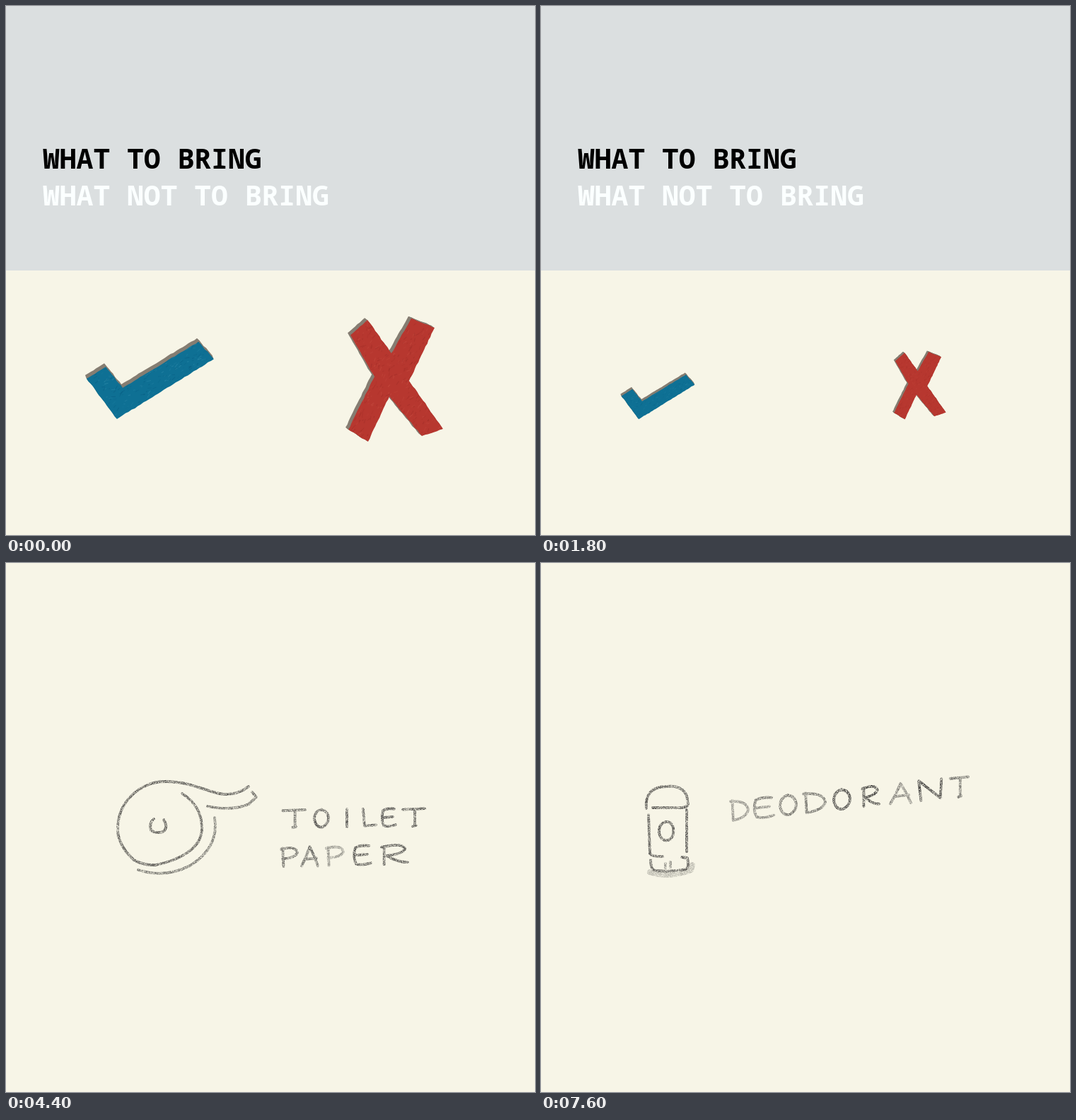
These frames come from a looping animation (748 by 748 pixels, 8 s). An HTML page with a canvas:

```html
<!DOCTYPE html>
<html lang="en">
<head>
<meta charset="utf-8">
<title>What to bring</title>
<style>
html, body { margin: 0; width: 100%; height: 100%; overflow: hidden; background: #f7f5e7; }
canvas { display: block; width: 100vw; height: 100vh; }
</style>
</head>
<body>
<canvas id="stage" width="748" height="748"></canvas>
<script>
const SIZE = 748, LOOP = 8000;
const ctx = document.getElementById('stage').getContext('2d');

function seeded(s) {
  return () => {
    s = (s + 0x6d2b79f5) | 0;
    let r = Math.imul(s ^ (s >>> 15), s | 1);
    r ^= r + Math.imul(r ^ (r >>> 7), r | 61);
    return ((r ^ (r >>> 14)) >>> 0) / 4294967296;
  };
}

function newCanvas(size) {
  const c = document.createElement('canvas');
  c.width = c.height = size;
  return c;
}

// ---- paper cut-outs ----

function roughPath(pts, rnd) {
  const path = new Path2D();
  pts.forEach(([x, y], i) => {
    const [nx, ny] = pts[(i + 1) % pts.length];
    const steps = Math.ceil(Math.hypot(nx - x, ny - y) / 5);
    for (let k = 0; k < steps; k++) {
      const u = k / steps, j = k ? 1 : 0.4;
      path.lineTo(x + (nx - x) * u + (rnd() - 0.5) * j, y + (ny - y) * u + (rnd() - 0.5) * j);
    }
  });
  path.closePath();
  return path;
}

function cutout(pts, o) {
  const rnd = seeded(o.seed);
  const fibres = Array.from({ length: 900 }, () => {
    const a = o.angle + (rnd() - 0.5) * 1.1, n = 2 + rnd() * 5;
    return { x: rnd() * 185, y: rnd() * 185, dx: Math.cos(a) * n, dy: Math.sin(a) * n,
             color: rnd() < 0.45 ? o.light : o.dark, alpha: 0.1 + rnd() * 0.35 };
  });
  return { ...o, path: roughPath(pts, rnd), fibres };
}

const check = cutout(
  [[1, 58], [28, 41], [52, 71], [159, 6], [181, 30], [44, 115]],
  { seed: 5, fill: '#0e7094', light: '#3690ae', dark: '#07577c', angle: -0.5, shade: [-2, -5] });
const cross = cutout(
  [[7, 27], [31, 6], [65, 53], [93, 4], [126, 17], [90, 92], [138, 160], [108, 170],
   [62, 114], [32, 178], [4, 161], [41, 86]],
  { seed: 9, fill: '#b7372f', light: '#cb5648', dark: '#962a25', angle: -0.9, shade: [-4, -3] });

function drawCutout(m, x, y, scale) {
  ctx.save();
  ctx.translate(x, y);
  ctx.scale(scale, scale);
  ctx.fillStyle = '#857d72';
  for (let k = 5; k > 0; k--) {
    ctx.save();
    ctx.translate(m.shade[0] * k / 5, m.shade[1] * k / 5);
    ctx.fill(m.path);
    ctx.restore();
  }
  ctx.fillStyle = m.fill;
  ctx.fill(m.path);
  ctx.clip(m.path);
  ctx.lineWidth = 1.1;
  for (const f of m.fibres) {
    ctx.globalAlpha = f.alpha;
    ctx.strokeStyle = f.color;
    ctx.beginPath();
    ctx.moveTo(f.x, f.y);
    ctx.lineTo(f.x + f.dx, f.y + f.dy);
    ctx.stroke();
  }
  ctx.restore();
}

// ---- pencil drawings ----

// Hand lettering in a box of 10 by 10
const glyphs = {
  A: 'M0 10 Q3 5 5 0 Q8 5 10 10 M2 6.5 L9 6',
  B: 'M1 0 L1 10 M1 0 Q9 0 8 3 Q6 5 1 5 Q10 5 10 7.5 Q9 10 1 10',
  C: 'M9 1 Q4 -1 1 4 Q-1 9 5 10 Q8 10 10 8',
  D: 'M1 0 L1.5 10 M0 0.5 Q9 0 10 5 Q9 9 1.5 10',
  E: 'M9 0 Q4 -0.5 1.5 1 Q0 6 2 9.5 Q5 10.5 10 9 M1 5 L8 4.5',
  F: 'M2 0 L2 10 M1 0.5 L10 0 M2 5 L9 4.5',
  G: 'M8 0.5 Q2 0 0.5 5 Q1 9 5 8.5 Q9 7 10 4 L5 5 M9.5 4.5 L9 11',
  H: 'M0 0.5 L1 10 M8 0 L10 10 M1 6 L9 5',
  I: 'M5 0 L5 10',
  J: 'M8 0 L8 7 Q6 12 1 8',
  K: 'M1 0 L1 10 M9 0 L1 6 L10 10',
  L: 'M1 0 L2 9.5 L10 9',
  M: 'M0 10 L1 1 L5 7 L9 0 L10 10',
  N: 'M1 10 L0 0 L9 9 L9.5 -0.5',
  O: 'M5 0 Q0 1 0 5.5 Q1 10 5.5 10 Q10 8.5 10 4.5 Q9 0 4 0.3',
  P: 'M1 0.5 L1.5 10 M0 1 Q9 -1 10 3 Q8 6 1 6',
  R: 'M1 1 L1 10 M0 1 Q8 -1.5 9 2 Q8 4.5 2 5.5 Q6 9 10 9',
  S: 'M9 1 Q2 -1 2 3 Q9 5 9 8 Q6 11 1 9',
  T: 'M0 0.5 L10 0 M5.5 0.5 L5.5 9.5 M4.5 10 L6 9.5',
  W: 'M0 0.5 L1.5 10 L5 4 L8 9.5 L10 0',
  Y: 'M0 0 Q2 4 5 5 M10 0 L4 11',
  '-': 'M0 5 L10 4.5'
};

// Grain that is rubbed out of the pencil lines
const grain = newCanvas(256);
{
  const g = grain.getContext('2d'), img = g.createImageData(256, 256), rnd = seeded(31);
  for (let i = 3; i < img.data.length; i += 4) img.data[i] = rnd() ** 1.8 * 220;
  g.putImageData(img, 0, 0);
}

function sketch(build) {
  const layer = newCanvas(SIZE), c = layer.getContext('2d');
  c.lineCap = c.lineJoin = 'round';
  c.strokeStyle = '#2c2b2a';
  const stroke = (path, alpha = 0.85, width = 3.8) => {
    c.globalAlpha = alpha;
    c.lineWidth = width;
    c.stroke(typeof path === 'string' ? new Path2D(path) : path);
  };
  // widths: one for all letters or a list; shades: one digit for each letter, 9 is darkest
  const word = (text, xs, y, widths, h, slope = 0, shades = '') => {
    [...text].forEach((ch, i) => {
      const w = widths[i] || widths;
      const p = new Path2D();
      p.addPath(new Path2D(glyphs[ch]),
        new DOMMatrix([w / 10, slope * w / 25, 0, h / 10, xs[i], y + slope * (xs[i] - xs[0])]));
      stroke(p, (shades[i] || 7) / 10);
    });
  };
  build(stroke, word);
  c.globalCompositeOperation = 'destination-out';
  c.fillStyle = c.createPattern(grain, 'repeat');
  c.globalAlpha = 1;
  c.fillRect(0, 0, SIZE, SIZE);
  c.globalAlpha = 0.45;
  c.scale(5, 5);
  c.fillRect(0, 0, SIZE / 5, SIZE / 5);
  return layer;
}

const cap = sketch((stroke, word) => {
  stroke('M150 370 C150 300 180 270 225 268 C275 270 295 315 294 366');
  stroke('M150 370 Q220 350 294 366 Q340 372 346 390 Q320 398 284 386 Q215 374 152 388 L150 370');
  stroke('M225 268 Q238 310 236 358', 0.6);
  word('BALL', [390, 424, 458, 488], 304, 22, 28);
  word('CAP', [390, 426, 460], 354, 22, 28);
});

const hat = sketch((stroke, word) => {
  stroke('M209 347 Q211 337 218 336 Q245 331 269 340 L274 353', 0.75);
  stroke('M173 428 C162 405 164 378 190 364 Q215 360 245 363 C275 366 310 372 325 392 ' +
         'Q330 400 328 418 C327 440 318 453 295 453 L276 454');
  stroke('M173 430 Q195 441 225 443 Q250 444 265 451', 0.8);
  stroke('M208 402 C208 384 282 384 282 403 C282 420 210 420 208 402 Z', 0.75);
  stroke('M160 421 L160 450 Q163 464 178 474 Q197 487 198 498 L203 520', 0.75);
  stroke('M324 453 Q322 472 300 488 Q275 507 250 515 Q225 533 209 560', 0.8);
  stroke('M200 531 Q194 525 210 528 Q224 531 223 536 Q215 538 200 531', 0.7);
  stroke('M203 532 L203 549', 0.3);
  word('GOOFY', [378, 415, 442, 474, 512], 358, [27, 22, 22, 26, 24], 27, 0, '67765');
  word('WIDE-BRIMMED', [369, 420, 441, 468, 503, 523, 553, 579, 594, 628, 664, 693],
       424, [32, 4, 20, 22, 8, 21, 19, 4, 28, 29, 19, 18], 28, 0, '978778866788');
  word('HAT', [375, 402, 423], 470, [21, 21, 19], 25, 0, '873');
});

const jacket = sketch((stroke, word) => {
  stroke('M158 362 Q160 338 180 338 Q202 338 204 362 Q182 378 158 362');
  stroke('M158 362 Q134 368 126 390 L105 452 L124 460 L142 410');
  stroke('M204 362 Q228 368 236 390 L257 452 L238 460 L220 410');
  stroke('M142 396 L140 468 Q180 474 222 468 L220 396');
  stroke('M181 372 L181 468', 0.6);
  word('RAIN', [310, 346, 386, 402], 364, [24, 24, 4, 24], 28);
  word('JACKET', [310, 344, 378, 412, 446, 480], 414, 23, 28);
});

const roll = sketch((stroke, word) => {
  stroke('M343 316 Q328 328 308 327 C285 325 265 309 225 309 C190 309 156 338 158 380 ' +
         'C160 398 170 410 181 420 Q195 428 212 427 C245 420 277 404 277 375 C277 352 265 336 249 326', 0.8);
  stroke('M209 362 Q202 367 205 378 Q212 383 222 380 Q230 374 223 363', 0.8);
  stroke('M187 434 Q225 446 260 428 Q302 402 295 360', 0.65);
  stroke('M285 344 Q320 351 343 341 L354 331 L348 324', 0.75);
  word('TOILET', [391, 436, 480, 503, 530, 561], 349, [32, 20, 4, 20, 21, 31], 25, -0.01, '788888');
  word('PAPER', [389, 418, 453, 490, 531], 402, [23, 23, 24, 26, 37], 27, -0.02, '77588');
});

const sheep = sketch((stroke, word) => {
  word('WOOL', [208, 245, 273, 302], 380, [25, 18, 18, 23], 20, -0.11, '7998');
  stroke('M403 356 Q385 350 381 370', 0.45);
  stroke('M389 370 Q377 376 377 388 Q380 398 390 400', 0.6);
  stroke('M413 362 Q413 348 423 349', 0.45);
  stroke('M423 358 Q426 346 438 345 Q446 346 446 354', 0.8);
  stroke('M467 354 Q470 346 478 347 Q481 350 479 354 Q487 344 495 352 Q499 360 490 365', 0.5);
  stroke('M510 363 Q512 350 528 351 Q542 353 540 362 Q535 370 527 370', 0.85);
  stroke('M526 378 Q531 393 516 395 L505 395', 0.45);
  stroke('M402 405 Q400 416 412 416', 0.5);
  stroke('M414 410 Q418 421 438 413', 0.7);
  stroke('M453 410 Q448 422 458 422 Q466 420 467 411', 0.4);
  stroke('M467 414 Q475 419 487 415 L488 407 Q498 412 502 402', 0.7);
  stroke('M414 428 L416 446 Q430 447 434 439 Q430 434 423 438 L422 426', 0.55);
  stroke('M496 418 L496 436 L510 436 Q520 433 515 428 L505 429 L504 415', 0.8);
});

const shirt = sketch((stroke, word) => {
  stroke('M210 316 Q235 334 260 316 L296 332 L310 366 L286 374 L278 358 L280 440 Q235 446 192 440 ' +
         'L194 358 L186 374 L162 366 L174 332 Z');
  word('COTTON', [350, 382, 414, 446, 478, 512], 368, 22, 27);
});

const boot = sketch((stroke, word) => {
  stroke('M180 282 Q210 274 244 280 L246 348 Q290 360 312 376 Q322 390 316 402 L178 402 Q186 340 180 282');
  stroke('M176 404 L176 418 L318 418 L318 404', 0.75);
  stroke('M222 304 L244 300 M222 322 L246 318 M226 342 L248 338', 0.65);
  word('BOOTS', [380, 416, 452, 488, 522], 344, 24, 29);
});

const stick = sketch((stroke, word) => {
  stroke('M149 347 C147 328 156 316 178 316 C198 314 206 324 207 334 L208 341 ' +
         'Q207 345 200 346 L158 346', 0.8);
  stroke('M152 356 L154 411 Q156 415 172 415', 0.8);
  stroke('M206 349 L206 408', 0.8);
  stroke('M177 366 Q166 368 167 382 Q170 394 180 392 Q189 388 187 374 Q184 365 176 366', 0.85);
  stroke('M155 420 Q155 434 162 435 Q185 437 205 433 Q210 430 207 417 L199 416', 0.75);
  stroke('M176 425 L176 431 M183 423 L183 430', 0.6);
  stroke('M154 437 Q180 446 212 434 L214 427', 0.3, 8);
  word('DEODORANT', [268, 299, 338, 371, 414, 454, 494, 534, 579], 336,
       [25, 30, 23, 31, 23, 24, 29, 34, 25], 28, -0.105, '567799697');
});

// ---- timeline ----

const slides = [
  [cap, check, 84, 528, 1],
  [hat, cross, 480, 474, 1],
  [jacket, check, 350, 140, 1.55],
  [roll, cross, 234, 377, 1.487],
  [sheep, check, 113, 469, 1],
  [shirt, cross, 480, 438, 1],
  [boot, check, 113, 469, 1],
  [stick, cross, 480, 438, 1]
];

const checkSizes = { M: [113, 469, 1], L: [67, 435, 1.553], S: [113, 518, 0.577] };
const crossSizes = { M: [480, 438, 1], L: [444, 397, 1.487], S: [497, 487, 0.548] };

function drawIntro(t) {
  ctx.fillStyle = '#dbdfe0';
  ctx.fillRect(0, 0, SIZE, 374);
  ctx.font = '600 39.7px "Noto Sans Mono", "DejaVu Sans Mono", monospace';
  ctx.fillStyle = '#000';
  ctx.fillText('WHAT TO BRING', 52, 230);
  ctx.fillStyle = '#fbffff';
  ctx.fillText('WHAT NOT TO BRING', 52, 282);
  const beat = Math.floor(t / 200) % 5;
  drawCutout(check, ...checkSizes['MLLSS'[beat]]);
  drawCutout(cross, ...crossSizes['MMLLS'[beat]]);
}

function draw(t) {
  ctx.fillStyle = '#f7f5e7';
  ctx.fillRect(0, 0, SIZE, SIZE);
  if (t < 2000) return drawIntro(t);
  const [drawing, ...stamp] = slides[Math.floor((t - 2000) / 800)];
  ctx.drawImage(drawing, 0, 0);
  if ((t - 2000) % 800 >= 400) drawCutout(...stamp);
}

const start = performance.now();
function tick() {
  draw((performance.now() - start) % LOOP);
  requestAnimationFrame(tick);
}
tick();
</script>
</body>
</html>
```
